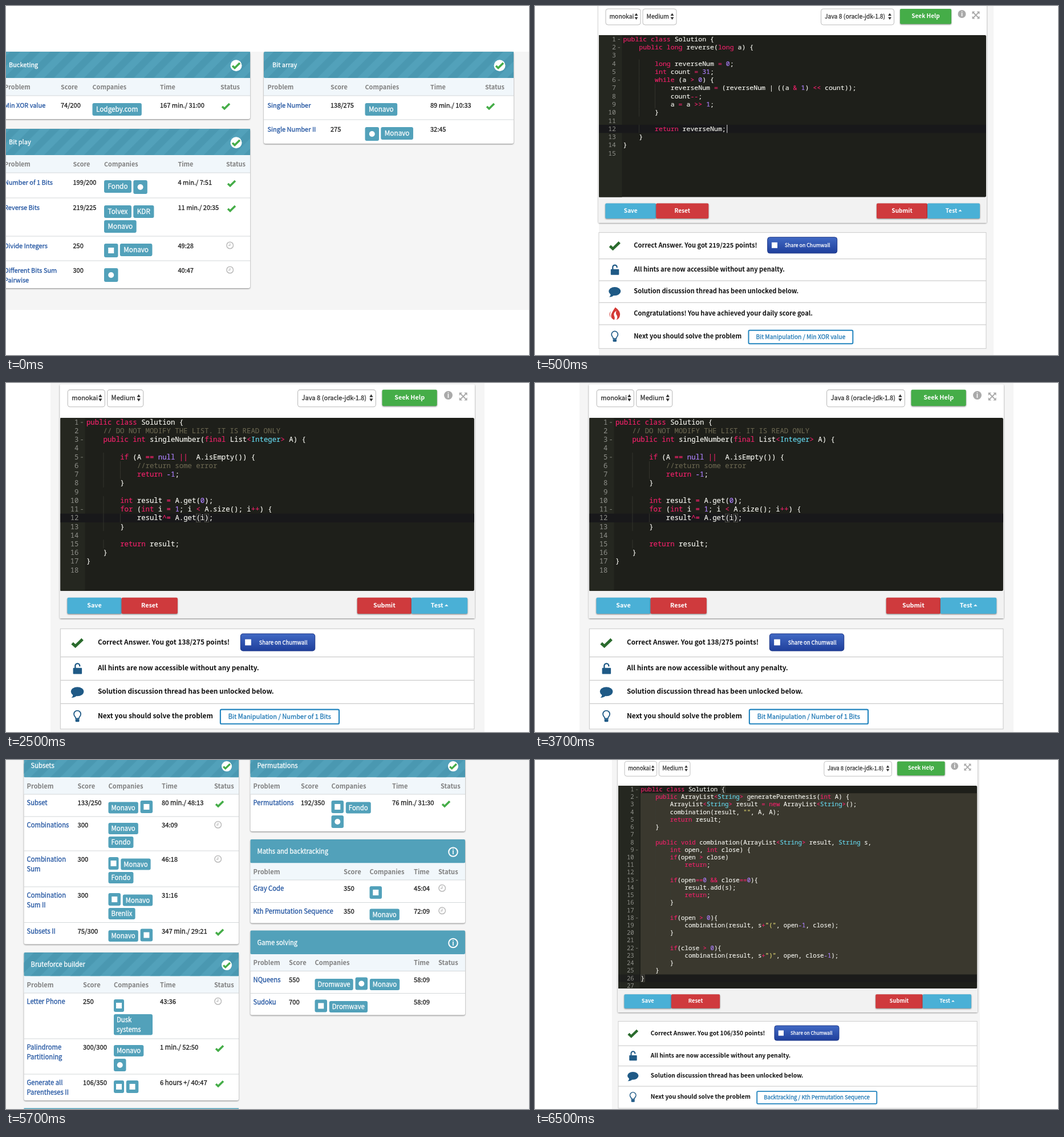
An HTML page for the animation above (8000 ms loop, 917x611 px).

```html
<!DOCTYPE html>
<html lang="en">
<head>
<meta charset="utf-8">
<title>Coding practice</title>
<style>
html, body { margin: 0; width: 100%; height: 100%; overflow: hidden; background: #fff; }
svg { display: block; width: 100%; height: 100%; }
text { font-family: "Noto Sans CJK JP", "Noto Sans CJK SC", Lato, sans-serif; stroke-width: .28; }
.code { font-family: "Noto Sans Mono", "DejaVu Sans Mono", monospace; font-weight: 500; stroke-width: .15; }
.card { filter: drop-shadow(0 1px 1.2px #0007); }
</style>
</head>
<body>
<svg id="stage" viewBox="0 0 917 611"></svg>
<script>
const SANS = '"Noto Sans CJK JP", "Noto Sans CJK SC", Lato, sans-serif';
const MONO = '"Noto Sans Mono", "DejaVu Sans Mono", monospace';
const TEAL = '#52a1ba', BLUE = '#4ab0d6', RED = '#cf3a3d', GREEN = '#45ad48', NAVY = '#1f5a86', LINK = '#2053a0';

const pen = document.createElement('canvas').getContext('2d');
function measure(str, font, weight = 400) {
  pen.font = `${weight} 100px ${font}`;
  return pen.measureText(str).width / 100;
}
// Font sizes are given for a face with these widths in em, whichever family is installed.
const unit = {
  400: 11.28 / measure('Kth Permutation Sequence', SANS),
  700: 21.3 / measure('All hints are now accessible without any penalty.', SANS, 700),
  mono: .6 / measure('0', MONO)
};
const widthOf = (str, size) => measure(str, SANS) * size * unit[400];

const esc = s => s.replace(/&/g, '&amp;').replace(/</g, '&lt;');
const rect = (x, y, w, h, fill, more = '') =>
  `<rect x="${x}" y="${y}" width="${w}" height="${h}" fill="${fill}" ${more}/>`;
const circle = (x, y, r, fill, more = '') => `<circle cx="${x}" cy="${y}" r="${r}" fill="${fill}" ${more}/>`;
const path = (d, fill, more = '') => `<path d="${d}" fill="${fill}" ${more}/>`;
const at = (x, y, body, s = 1) => `<g transform="translate(${x} ${y}) scale(${s})">${body}</g>`;
// y is the middle of the capitals; a thin stroke brings regular text to medium weight
const text = (x, y, str, size, fill = '#1c1c1c', weight = 400, anchor = 'start') =>
  `<text x="${x}" y="${y + size * .33}" font-size="${size * unit[weight]}" font-weight="${weight}" fill="${fill}" stroke="${weight === 400 ? fill : 'none'}" text-anchor="${anchor}">${esc(str)}</text>`;

const tick = (x, y, s, color) =>
  at(x, y, path('M-6.5 .5L-2.5 4.2L6.5 -4.5', 'none', `stroke="${color}" stroke-width="3.6"`), s);
const clock = (x, y) =>
  circle(x, y, 5.8, 'none', 'stroke="#bbb" stroke-width="1.5"') +
  path(`M${x} ${y - 3.5}v4h-3`, 'none', 'stroke="#bbb" stroke-width="1.2"');

/* ---------- problem tables ---------- */
const LARGE = { size: 12.15, chip: 13, chipH: 22, iconH: 24, iconW: 24.5, pad: 6.5, gap: 3.3, dy: 13, drop: 0,
  step: 26, textY: 17, head: 46, th: 31, titleX: 15, mark: 24.5, r: 10, line: 17 };
const SMALL = { size: 12.45, chip: 12.6, chipH: 20, iconH: 22, iconW: 21.5, pad: 5, gap: 3.8, dy: 11, drop: 2.5,
  step: 24, textY: 15.3, head: 41.5, th: 29.5, titleX: 12, mark: 21, r: 9, line: 16.5 };

// # square icon, ! narrow square icon, @ round icon, _ line break inside a chip
function chips(spec, x0, y, k) {
  let out = '';
  for (const line of spec.split('|')) {
    const hasIcon = /[#!@]/.test(line);
    let x = x0;
    for (const name of line.split(' ')) {
      const icon = '#!@'.includes(name), words = name.split('_');
      const w = icon ? (name === '!' ? k.iconW - 3.5 : k.iconW)
        : words[1] ? 68 : widthOf(name, k.chip) + 2 * k.pad;
      const h = icon ? k.iconH : k.chipH + (words.length - 1) * 16.5;
      const top = y + (hasIcon && !icon ? k.drop : 0);
      out += rect(x, top, w, h, TEAL, 'rx="3"');
      if (name === '@') out += circle(x + w / 2, top + h / 2, 5, '#fff');
      else if (icon) out += rect(x + w / 2 - 5, top + h / 2 - 5, 10, 10, '#fff');
      else words.forEach((s, i) => out += text(x + k.pad, top + k.chipH / 2 + i * 16.5, s, k.chip, '#fff'));
      x += w + k.gap;
    }
    y += k.step + (hasIcon && k.drop ? 2 : 0);
  }
  return out;
}

function table(k, x, y, w, title, done, cols, rows) {
  const top = y + k.head + k.th, end = rows.reduce((s, r) => s + r[0], top);
  const mx = x + w - k.mark, my = y + k.head / 2 + 1.3;
  let out = rect(x, y, w, end - y, '#fff', 'rx="3" class="card"');
  out += at(x, y, rect(0, 0, w, k.head, TEAL, 'rx="2"') + (done ? rect(0, 0, w, k.head, 'url(#stripes)') : ''));
  out += text(x + k.titleX, y + k.head / 2 + .2, title, k.size, '#fff');
  out += done ? circle(mx, my, k.r, '#fff') + tick(mx, my, k.r / 9 * .9, GREEN)
    : circle(mx, my, k.r - 1.2, 'none', 'stroke="#fff" stroke-width="2"') + text(mx, my, 'i', 12.5, '#fff', 700, 'middle');
  out += rect(x, y + k.head, w, k.th, '#f1f7fb');
  ['Problem', 'Score', 'Companies', 'Time', 'Status'].forEach((s, i) =>
    out += text(cols[i], y + k.head + k.th / 2 + .5, s, k.size, '#808080', 700));
  let ry = top;
  for (const [h, problem, score, firms, time, state] of rows) {
    const ty = ry + k.textY;
    out += rect(x, ry - .5, w, 1, '#d4d8da');
    problem.split('|').forEach((s, i) => out += text(cols[0], ty + i * k.line, s, k.size, LINK));
    out += text(cols[1], ty, score, k.size) + chips(firms, cols[2], ry + k.dy, k) + text(cols[3], ty, time, k.size);
    if (state === 'done') out += tick(cols[4] + 9.5, ty + 1.5, 1, GREEN);
    if (state === 'late') out += clock(cols[4] + 6.7, ty - 1);
    ry += h;
  }
  return out;
}

const bits = rect(0, 80, 917, 452, '#f5f5f5') +
  table(LARGE, -10, 80, 438, 'Bucketing', true, [-3, 96, 151.5, 270, 376], [
    [41, 'Min XOR value', '74/200', 'Lodgeby.com', '167 min./ 31:00', 'done']]) +
  table(LARGE, -10, 215, 438, 'Bit play', true, [-3, 117.5, 172, 301.5, 386], [
    [44, 'Number of 1 Bits', '199/200', 'Fondo @', '4 min./ 7:51', 'done'],
    [67, 'Reverse Bits', '219/225', 'Tolvex KDR|Monavo', '11 min./ 20:35', 'done'],
    [43, 'Divide Integers', '250', '# Monavo', '49:28', 'late'],
    [48, 'Different Bits Sum|Pairwise', '300', '@', '40:47', 'late']]) +
  table(LARGE, 452, 80, 438, 'Bit array', true, [458.5, 569, 629.5, 744, 840], [
    [42, 'Single Number', '138/275', 'Monavo', '89 min./ 10:33', 'done'],
    [42, 'Single Number II', '275', '@ Monavo', '32:45', '']]);

const backtracking = rect(0, 0, 917, 611, '#f5f5f5') +
  table(SMALL, 31.5, -11, 376.5, 'Subsets', true, [36.5, 125.5, 179.5, 273, 365], [
    [39, 'Subset', '133/250', 'Monavo #', '80 min./ 48:13', 'done'],
    [60, 'Combinations', '300', 'Monavo|Fondo', '34:09', 'late'],
    [63, 'Combination|Sum', '300', '! Monavo|Fondo', '46:18', 'late'],
    [62.5, 'Combination|Sum II', '300', '# Monavo|Brenlix', '31:16', ''],
    [38, 'Subsets II', '75/300', 'Monavo #', '347 min./ 29:21', 'done']]) +
  table(SMALL, 31.5, 337, 376.5, 'Bruteforce builder', true, [36.5, 135, 189, 270, 365], [
    [80, 'Letter Phone', '250', '!|Dusk_systems', '43:36', 'late'],
    [62, 'Palindrome|Partitioning', '300/300', 'Monavo|@', '1 min./ 52:50', 'done'],
    [46, 'Generate all|Parentheses II', '106/350', '! #', '6 hours +/ 40:47', 'done']]) +
  rect(31.5, 609.5, 376.5, 2, TEAL) +
  table(SMALL, 428.5, -11, 376.5, 'Permutations', true, [433.5, 517, 570.5, 677, 762], [
    [65, 'Permutations', '192/350', '# Fondo|@', '76 min./ 31:30', 'done']]) +
  table(SMALL, 428.5, 139, 376.5, 'Maths and backtracking', false, [433.5, 592, 637.5, 715, 758], [
    [39.5, 'Gray Code', '350', '#', '45:04', 'late'],
    [36, 'Kth Permutation Sequence', '350', 'Monavo', '72:09', 'late']]) +
  table(SMALL, 428.5, 298.5, 376.5, 'Game solving', false, [433.5, 496, 541.5, 715, 758], [
    [39, 'NQueens', '550', 'Dromwave @ Monavo', '58:09', ''],
    [38, 'Sudoku', '700', '# Dromwave', '58:09', '']]);

/* ---------- code editor ---------- */
const PITCH = 6.93, LEAD = 14.27, LEFT = 42.6, WIDE = 679;
const TOKEN = /(\/\/.*)|("[^"]*")|\b(Integer|String)\b|(-?\b\d+|\bnull\b)|(\b(?:public|class|long|int|while|return|final|if|for|new|void)\b|\|\||[-+=<>&^]+)|\w+|[^\s\w]/g;
const INK = ['#68644f', '#e6db74', '#66d9ef', '#ae81ff', '#f2216a'];

const codeText = (x, y, body, fill, more = '') =>
  `<text class="code" x="${x}" y="${y + 3.8}" font-size="${11.55 * unit.mono}" fill="${fill}" ${more}>${body}</text>`;

function codeLine(line, y) {
  let out = '';
  for (let col = 4; col < line.search(/\S/); col += 4)
    out += rect(LEFT + col * PITCH, y - LEAD / 2, .7, LEAD, '#3b3c34');
  for (const m of line.matchAll(TOKEN)) {
    const ink = INK[m.slice(1).findIndex(Boolean)] || '#f8f8f2';
    out += codeText(LEFT + m.index * PITCH, y, esc(m[0]), ink, `stroke="${ink}"`);
  }
  return out;
}

const select = (x, w, label) =>
  rect(x, -46, w, 28, '#fff', 'rx="4" stroke="#bbb"') + text(x + 6.5, -33, label, 11.5, '#333') +
  path(`M${x + w - 10.5} -34h6l-3 -4.5zm0 2.5h6l-3 4.5z`, '#333');
const button = (x, y, w, label, fill, cx = x + w / 2) =>
  rect(x, y, w, 26.5, fill, 'rx="2" class="card"') + text(cx, y + 12.5, label, 11.3, '#fff', 700, 'middle');

const ICONS = {
  tick: tick(0, 0, 1.3, '#2a6b2d'),
  lock: rect(-7, -1, 14.5, 10, NAVY, 'rx="1"') +
    path('M-3.5 0v-4.5a3.7 3.7 0 0 1 7.4 0v1', 'none', `stroke="${NAVY}" stroke-width="2.2"`),
  talk: `<ellipse cy="-.5" rx="10.5" ry="7.5" fill="${NAVY}"/>` + path('M-7 3Q-7 8 -10 9.5Q-4 9.5 -1 6z', NAVY),
  fire: path('M1 -11Q11 -4 9 4Q8 9 3 11Q6 6 3 2Q1 -1 3 -5Q-3 -1 -1 4Q1 8 -1 11Q-8 8 -6 1Q-4 -4 1 -11zM-6 -5Q-10 1 -7 7Q-12 1 -6 -5z', '#d43a36'),
  bulb: path('M-2.7 3.5Q-2.7 1.5 -4.2 0A5.6 5.6 0 1 1 4.2 0Q2.7 1.5 2.7 3.5z', 'none', `stroke="${NAVY}" stroke-width="1.7"`) +
    rect(-3.2, 4.5, 6.4, 4.5, NAVY, 'rx="1"')
};

function editor(o) {
  const H = o.height, lines = o.code.split('\n');
  let out = rect(-1, -55, WIDE + 2, H + 100, '#fff', 'rx="2" class="card"') + rect(-1, H, WIDE + 2, 45, '#f2f2f2');
  out += select(12, 61, 'monokai') + select(77, 59, 'Medium') + select(389.5, 128, 'Java 8 (oracle-jdk-1.8)');
  out += button(528, -46, 90, 'Seek Help', GREEN);
  out += circle(636.5, -37, 7, '#aaa') + text(636.5, -37, 'i', 11.5, '#fff', 700, 'middle');
  out += at(661, -35, path('M-5 -5L5 5M5 -5L-5 5', 'none', 'stroke="#aaa" stroke-width="1.8"') +
    path('M-6.5 -6.5h5l-5 5zM6.5 -6.5h-5l5 5zM-6.5 6.5h5l-5 -5zM6.5 6.5h-5l5 -5z', '#aaa'));

  out += rect(0, 0, WIDE, H, '#1e1f1a', 'rx="2"') + rect(0, 0, 40.5, H, '#252720');
  if (o.selected) {
    const [a, b] = o.selected;
    out += rect(LEFT - .5, a * LEAD, WIDE - LEFT + .5, (b - a) * LEAD, '#3a382e') +
      rect(LEFT - .5, b * LEAD, PITCH + 2, LEAD, '#3a382e');
  }
  out += rect(0, (o.active - 1) * LEAD, WIDE, LEAD, '#18181a', o.selected ? 'opacity=".5"' : '');
  for (const [row, col] of o.boxes || [])
    out += rect(LEFT + col * PITCH, (row - 1) * LEAD + .5, PITCH, LEAD - 1, 'none', 'stroke="#5a5a50" stroke-width=".7"');
  lines.forEach((line, i) => {
    const y = 7 + i * LEAD;
    out += codeText(30, y, i + 1, '#8f908a', 'text-anchor="end"') + codeLine(line, y);
    if (line.endsWith('{')) out += rect(33.5, y, 3.5, 1, '#77786f');
  });
  if (o.caret) out += rect(LEFT + o.caret * PITCH + 1.5, (o.active - 1) * LEAD, 1, LEAD, '#ddd');

  out += button(11.3, H + 11, 89, 'Save', BLUE) + button(100.3, H + 11, 92, 'Reset', RED) +
    button(487, H + 11, 89, 'Submit', RED) + button(576, H + 11, 92, 'Test', BLUE, 618) +
    path(`M630.5 ${H + 25}h6l-3 -3z`, '#fff');

  const notes = [
    [46, 'tick', `Correct Answer. You got ${o.score} points!`],
    [38.3, 'lock', 'All hints are now accessible without any penalty.'],
    [38.3, 'talk', 'Solution discussion thread has been unlocked below.'],
    [38.7, 'fire', 'Congratulations! You have achieved your daily score goal.'],
    [41.7, 'bulb', 'Next you should solve the problem']
  ].filter(n => o.goal || n[1] !== 'fire');
  let y = H + 62;
  out += rect(0, y, WIDE, notes.reduce((s, n) => s + n[0], 0), '#fff', 'stroke="#ccc"');
  notes.forEach(([h, icon, str], i) => {
    const c = y + h / 2 - .8;
    if (i) out += rect(0, y - .5, WIDE, 1.2, '#ccc');
    out += at(27.8, c + .8, ICONS[icon]) + text(61.3, c, str, 12.44, '#111', 700);
    if (icon === 'tick')
      out += rect(295.7, c - 14, 122, 28, 'url(#share)', 'rx="4" stroke="#1c3687"') +
        rect(303, c - 5, 10, 10, '#fff') + text(326, c + .3, 'Share on Chumwall', 9.7, '#fff');
    if (icon === 'bulb')
      out += rect(262.5, c - 10.3, widthOf(o.next, 11.45) + 26, 23.5, '#fff', 'rx="2" stroke="#2385bf" stroke-width="2"') +
        text(275.5, c + 1.2, o.next, 11.45, '#1f78b5');
    y += h;
  });
  return rect(o.page[0], 0, o.page[1] - o.page[0], 611, '#f5f5f5') + at(o.x, o.y, out, o.scale);
}

const reverse = editor({
  x: 112, y: 51, scale: 1, height: 283.6, page: [112, 804], active: 12, caret: 26, goal: true,
  score: '219/225', next: 'Bit Manipulation / Min XOR value',
  code: `public class Solution {
    public long reverse(long a) {

        long reverseNum = 0;
        int count = 31;
        while (a > 0) {
            reverseNum = (reverseNum | ((a & 1) << count));
            count--;
            a = a >> 1;
        }

        return reverseNum;
    }
}
`});

const single = editor({
  x: 95.4, y: 61, scale: 1.0685, height: 283.6, page: [78, 839], active: 12, boxes: [[12, 26], [12, 28]],
  score: '138/275', next: 'Bit Manipulation / Number of 1 Bits',
  code: `public class Solution {
    // DO NOT MODIFY THE LIST. IT IS READ ONLY
    public int singleNumber(final List<Integer> A) {

        if (A == null ||  A.isEmpty()) {
            //return some error
            return -1;
        }

        int result = A.get(0);
        for (int i = 1; i < A.size(); i++) {
            result^= A.get(i);
        }

        return result;
    }
}
`});

const parens = editor({
  x: 146, y: 45, scale: .9265, height: 383.2, page: [135, 780], active: 26, selected: [1, 25], boxes: [[1, 22], [26, 0]],
  score: '106/350', next: 'Backtracking / Kth Permutation Sequence',
  code: `public class Solution {
    public ArrayList<String> generateParenthesis(int A) {
        ArrayList<String> result = new ArrayList<String>();
        combination(result, "", A, A);
        return result;
    }

    public void combination(ArrayList<String> result, String s,
        int open, int close) {
        if(open > close)
            return;

        if(open==0 && close==0){
            result.add(s);
            return;
        }

        if(open > 0){
            combination(result, s+"(", open-1, close);
        }

        if(close > 0){
            combination(result, s+")", open, close-1);
        }
    }
}
`});

/* ---------- playback ---------- */
const stage = document.getElementById('stage');
const scenes = [[0, bits], [500, reverse], [2500, single], [4500, backtracking], [6500, parens]];
stage.innerHTML = `<defs>
  <pattern id="stripes" width="35" height="35" patternUnits="userSpaceOnUse">
    <path d="M35 17.5V35H17.5zM17.5 0H35L0 35V17.5z" fill="#4a98b1"/>
  </pattern>
  <linearGradient id="share" x2="0" y2="1"><stop stop-color="#4169c4"/><stop offset="1" stop-color="#1f3f9b"/></linearGradient>
</defs>` + scenes.map(s => `<g class="scene">${s[1]}</g>`).join('');
const groups = [...stage.querySelectorAll('.scene')];

function draw(now) {
  const t = now % 8000, current = scenes.findLastIndex(s => s[0] <= t);
  groups.forEach((g, i) => g.style.display = i === current ? '' : 'none');
  requestAnimationFrame(() => draw(performance.now()));
}
draw(performance.now());
</script>
</body>
</html>
```
